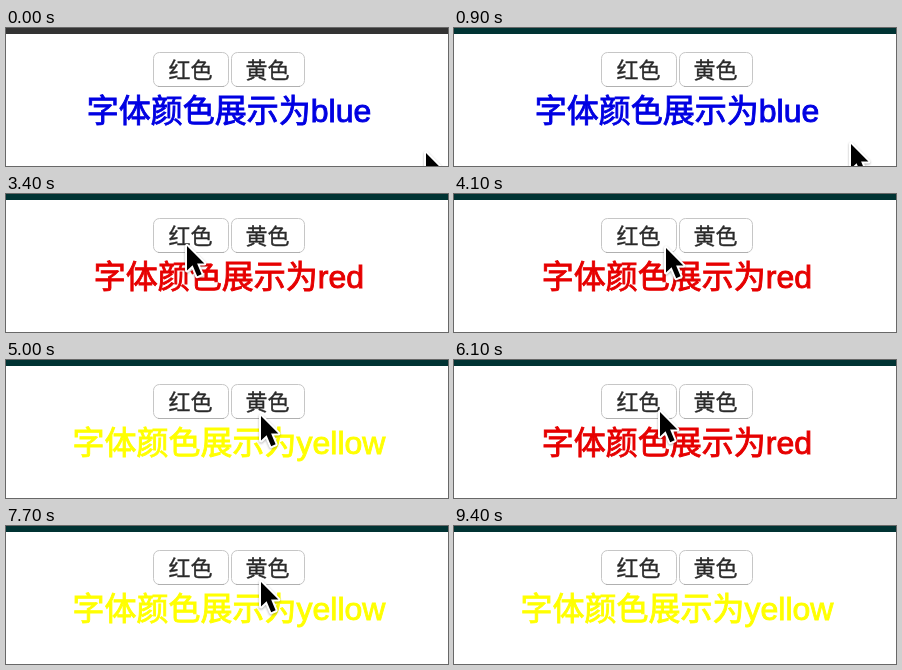
Write an HTML page that moves like this. It is 442 px wide and 138 px high and loops after 9.5 s.

```html
<!DOCTYPE html>
<html lang="zh-CN">
<head>
<meta charset="utf-8">
<title>字体颜色</title>
<style>
  html, body { margin: 0; width: 100%; height: 100%; overflow: hidden; background: #fff; }
  svg { display: block; width: 442px; height: 138px; }
  text { font-family: "Liberation Sans", "Noto Sans CJK SC", "Noto Sans CJK", sans-serif; text-anchor: middle; }
  .button rect { fill: #fff; stroke: #c6c6c6; }
  .button path { stroke: #b0b0b0; }
  .button text { font-size: 22px; fill: #2a2a2a; stroke: #2a2a2a; stroke-width: .35px; }
  #label { font-size: 32px; fill: currentColor; stroke: currentColor; stroke-width: .9px; }
  #arrow { filter: drop-shadow(0 1px 1px rgba(0, 0, 0, .3)); }
  #arrow path { stroke: #fff; stroke-width: 4; stroke-linejoin: round; paint-order: stroke; }
  #beam { fill: none; stroke-linecap: round; }
  #beam use { stroke: #fff; stroke-width: 5; }
  #beam use + use { stroke: #000; stroke-width: 2; }
</style>
</head>
<body>
<svg viewBox="0 0 442 138">
  <defs>
    <path id="beamShape" d="M-6-15Q0-15 0-10Q0-15 6-15M0-10V10M-6 15Q0 15 0 10Q0 15 6 15M-3 6H3"/>
  </defs>
  <rect id="bar" width="442" height="6"/>
  <g class="button">
    <rect x="147.5" y="24.5" width="75" height="34" rx="6"/>
    <path d="M152 58.5H218"/>
    <text x="184.5" y="50">红色</text>
  </g>
  <g class="button">
    <rect x="225.5" y="24.5" width="73" height="34" rx="6"/>
    <path d="M230 58.5H294"/>
    <text x="261.5" y="50">黄色</text>
  </g>
  <text id="label" x="223" y="94"></text>
  <g id="pointer">
    <g id="arrow"><path d="M0 0V24.5L5.6 19.3L10.2 30.2L14.6 28.3L10.1 17.6H17.4Z"/></g>
    <g id="beam"><use href="#beamShape"/><use href="#beamShape"/></g>
  </g>
</svg>
<script>
  const LOOP = 9500, STEP = 100, ARC = 18;
  const $ = id => document.getElementById(id);
  const bar = $('bar'), label = $('label'), pointer = $('pointer'), arrow = $('arrow'), beam = $('beam');

  const entry = { x: 420, y: 125 };
  const red = { x: 206, y: 52 };
  const yellow = { x: 255, y: 56 };
  const moves = [
    { at: 0, time: 900, to: { x: 397, y: 116 } },
    { at: 1700, time: 100, to: { x: 253, y: 85 } },
    { at: 1900, time: 1000, to: { x: 181, y: 52 }, arc: -3 },
    { at: 4000, time: 100, to: { x: 212, y: 54 } },
    { at: 4100, time: 600, to: yellow, arc: ARC },
    { at: 5000, time: 900, to: red, arc: ARC },
    { at: 6600, time: 1000, to: yellow, arc: ARC },
    { at: 7700, time: 900, to: { x: 394, y: 128 } },
    { at: 9200, time: 100, to: { x: 394, y: 142 } }
  ];
  const clicks = [
    { at: 0, word: 'blue', color: '#0000e2' },
    { at: 3400, word: 'red', color: '#e60000' },
    { at: 4700, word: 'yellow', color: '#ffff00' },
    { at: 6100, word: 'red', color: '#e60000' },
    { at: 7700, word: 'yellow', color: '#ffff00' }
  ];

  const current = (list, t) => list.findLast(item => item.at <= t);
  const smooth = k => k * k * (3 - 2 * k);

  function position(t) {
    const move = current(moves, t);
    const { at, time, to, arc = 0 } = move;
    const from = moves[moves.indexOf(move) - 1]?.to || entry;
    const k = smooth(Math.min(1, (t - at) / time));
    return {
      x: from.x + (to.x - from.x) * k,
      y: from.y + (to.y - from.y) * k - arc * 4 * k * (1 - k)
    };
  }

  function draw(t) {
    const { word, color } = current(clicks, t);
    bar.setAttribute('fill', t < STEP ? '#333333' : '#003333');
    label.textContent = '字体颜色展示为' + word;
    label.style.color = color;

    const { x, y } = position(t);
    const halfText = label.getComputedTextLength() / 2;
    const overText = y > 61 && y < 101 && Math.abs(x - 223) < halfText;
    pointer.setAttribute('transform', `translate(${Math.round(x)} ${Math.round(y)})`);
    arrow.style.display = overText ? 'none' : '';
    beam.style.display = overText ? '' : 'none';
  }

  const start = performance.now();
  function tick() {
    const t = (performance.now() - start) % LOOP;
    draw(Math.floor(t / STEP) * STEP);
    requestAnimationFrame(tick);
  }
  tick();
</script>
</body>
</html>
```
